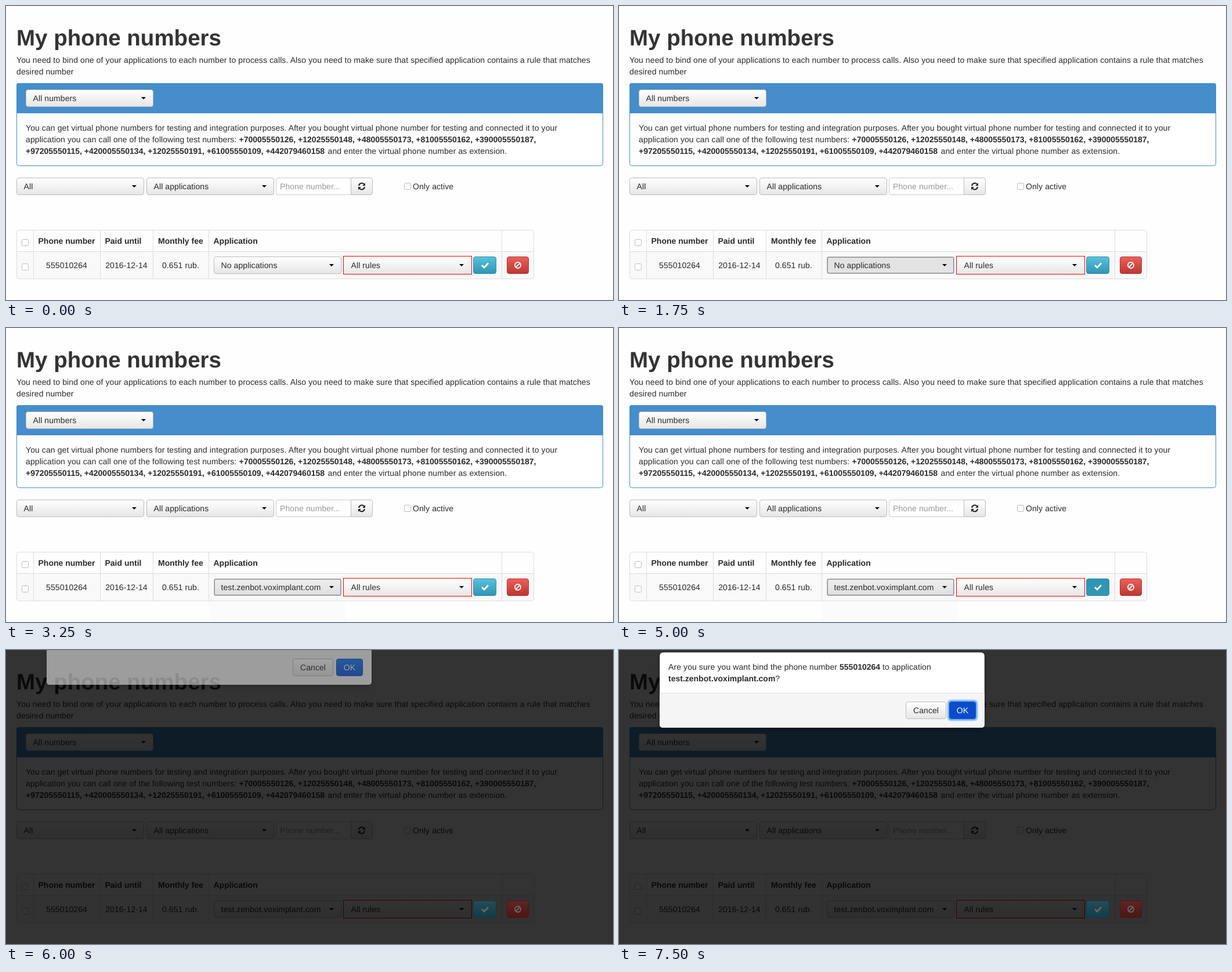
An HTML page for the animation above (8 s loop, 1046 px wide and 507 px high).

```html
<!DOCTYPE html>
<html lang="en">
<head>
<meta charset="utf-8">
<title>My phone numbers</title>
<style>
html, body { margin: 0; width: 100%; height: 100%; overflow: hidden; background: #fefefe; }
svg { display: block; }
text { font: 14px "Liberation Sans", Arial, sans-serif; fill: #2a2a2a; letter-spacing: .09px; text-rendering: geometricPrecision; white-space: pre; }
.b { font-weight: bold; letter-spacing: 0; }
.h1 { font-size: 38.5px; font-weight: bold; letter-spacing: 0; fill: #333; }
.mid { text-anchor: middle; }
.white { fill: #fff; }
.hint { fill: #999; }
.line { fill: none; stroke: #ddd; }
</style>
</head>
<body>
<svg id="stage" width="1046" height="507" viewBox="0 0 1046 507"></svg>
<script>
const LOOP = 8000;
const NUMBER = '555010264';
const APP = 'test.zenbot.voximplant.com';
const BLUE = '#458ecb';
const stage = document.getElementById('stage');

const rect = (x, y, w, h, attrs = '') => `<rect x="${x}" y="${y}" width="${w}" height="${h}" ${attrs}/>`;
const text = (x, y, s, cls = '', attrs = '') => `<text x="${x}" y="${y}" class="${cls}" ${attrs}>${s}</text>`;
const bold = s => `<tspan class="b">${s}</tspan>`;
const gradient = (id, top, bottom) =>
  `<linearGradient id="${id}" x2="0" y2="1"><stop stop-color="${top}"/><stop offset="1" stop-color="${bottom}"/></linearGradient>`;
const button = (x, y, w, fill, stroke, attrs = '') =>
  rect(x + .5, y + .5, w - 1, 29, `rx="3.5" fill="${fill}" stroke="${stroke}" ${attrs}`);
const caret = (x, y) => `<path d="M${x} ${y}h8l-4 4z" fill="#000"/>`;
const select = (x, y, label, id = '') =>
  button(x, y, 220, 'url(#light)', '#bbb', id && `id="${id}"`) +
  text(x + 12.5, y + 20, label, '', id && `id="${id}Label"`) + caret(x + 199, y + 13);
const checkbox = (x, y) => rect(x + .5, y + .5, 11, 11, 'rx="2" fill="#fff" stroke="#bbb"');
const menuItem = (id, y, label) =>
  rect(359, y, 218, 26, `id="${id}" fill="url(#hover)"`) + text(379, y + 18, label, '', `id="${id}Label"`);

const defs = `<defs>
  ${gradient('light', '#fff', '#e6e6e6')}
  ${gradient('held', '#efefef', '#dedede')}
  ${gradient('teal', '#5bc0de', '#2f96b4')}
  ${gradient('red', '#ee5f5b', '#bd362f')}
  ${gradient('blue', '#1a7cf0', '#1458e0')}
  ${gradient('hover', '#0088cc', '#0077b3')}
  <filter id="shadow" x="-10%" y="-30%" width="120%" height="170%">
    <feDropShadow dx="0" dy="4" stdDeviation="4" flood-opacity=".25"/>
  </filter>
  <filter id="glow" x="-20%" y="-30%" width="140%" height="160%"><feGaussianBlur stdDeviation="1"/></filter>
</defs>`;

const intro =
  text(18, 67.5, 'My phone numbers', 'h1') +
  text(18, 98, 'You need to bind one of your applications to each number to process calls. Also you need to make sure that specified application contains a rule that matches') +
  text(18, 118, 'desired number');

const panel =
  rect(18.5, 133.5, 1010, 142, `rx="4" fill="#fff" stroke="${BLUE}"`) +
  `<path d="M18 185V137q0-4 4-4H1025q4 0 4 4V185z" fill="${BLUE}"/>` +
  select(34, 144, 'All numbers') +
  text(34, 215, 'You can get virtual phone numbers for testing and integration purposes. After you bought virtual phone number for testing and connected it to your') +
  text(34, 235, 'application you can call one of the following test numbers:') +
  text(401.5, 235, '+70005550126, +12025550148, +48005550173, +81005550162, +390005550187,', 'b') +
  text(34, 255, '+97205550115, +420005550134, +12025550191, +61005550109, +442079460158', 'b') +
  text(554.5, 255, 'and enter the virtual phone number as extension.');

const refresh = `<g fill="none" stroke="#222" stroke-width="2">
  <path d="M608 310a5.2 5.2 0 0 1 9-2.7M618 312a5.2 5.2 0 0 1-9 2.7"/>
  <path d="M619 305v5h-5zM607 317v-5h5z" fill="#222" stroke="none"/></g>`;

const filters =
  select(18, 296, 'All') + select(242, 296, 'All applications') +
  '<path d="M594.5 296.5H469q-3.5 0-3.5 3.5v22q0 3.5 3.5 3.5H594.5z" fill="#fff" stroke="#ccc"/>' +
  text(472, 316, 'Phone number...', 'hint') +
  '<path d="M594.5 296.5H628q3.5 0 3.5 3.5v22q0 3.5-3.5 3.5H594.5z" fill="url(#light)" stroke="#bbb"/>' +
  refresh + checkbox(686, 305) + text(701, 316, 'Only active');

const actions = `<g id="actions">
  ${button(805, 432, 40, 'url(#teal)', '#2f8fab', 'id="confirm"')}
  <path d="M820 447l4 4 7-7.5" fill="none" stroke="#fff" stroke-width="2.8"/>
  ${button(863, 432, 38, 'url(#red)', '#b03a35')}
  <g fill="none" stroke="#fff" stroke-width="1.9"><circle cx="882" cy="447" r="5"/><path d="M878.5 450.5l7-7"/></g>
</g>`;

const table =
  rect(18, 424, 891, 46, 'rx="3" fill="#f9f9f9"') +
  rect(18.5, 386.5, 891, 84, 'rx="4" class="line"') +
  `<path class="line" d="M18 423.5H910${[47, 162, 253, 349, 854].map(x => `M${x}.5 387V470`).join('')}"/>` +
  checkbox(27, 402) + checkbox(27, 444) +
  text(55.5, 410, 'Phone number', 'b') + text(170.5, 410, 'Paid until', 'b') +
  text(262, 410, 'Monthly fee', 'b') + text(357.5, 410, 'Application', 'b') +
  text(104.5, 452, NUMBER, 'mid') + text(207.5, 452, '2016-12-14', 'mid') + text(301, 452, '0.651 rub.', 'mid') +
  select(358, 432, 'No applications', 'app') +
  rect(359.5, 433.5, 217, 27, 'id="focus" fill="none" stroke="#333" stroke-dasharray="1"') +
  rect(581.5, 431.5, 221, 31, 'fill="url(#light)" stroke="#f00"') +
  text(594.5, 452, 'All rules') + caret(781, 445) + actions;

const menu = `<g id="menu">
  ${rect(358.5, 464.5, 219, 70, 'rx="6" fill="#fff" stroke="#ccc" filter="url(#shadow)"')}
  ${menuItem('first', 470, 'No applications')}${menuItem('second', 496, APP)}
</g>`;

const modal = `<g id="modal">
  ${rect(70, 4, 560, 130, 'rx="6" fill="#fff" stroke="#000" stroke-opacity=".3" filter="url(#shadow)"')}
  <path d="M70 74H630V128q0 6-6 6H76q-6 0-6-6z" fill="#f5f5f5"/>
  <path d="M70 74.5H630" stroke="#ddd"/>
  ${text(85, 34, `Are you sure you want bind the phone number ${bold(NUMBER)} to application`)}
  ${text(85, 54, `${bold(APP)}?`)}
  ${button(494, 89, 70, 'url(#light)', '#bbb')}${text(529, 109, 'Cancel', 'mid')}
  ${rect(568, 88, 48, 32, 'id="ring" rx="4" fill="none" stroke="#4d9cf5" stroke-width="3" filter="url(#glow)"')}
  ${button(569, 89, 46, 'url(#blue)', '#0b4fc4', 'id="ok"')}${text(592, 109, 'OK', 'mid white')}
</g>`;

stage.innerHTML = defs + rect(0, 0, 1046, 507, 'fill="#fefefe"') + intro + panel + filters +
  rect(350, 471, 235, 36, 'id="trace" fill="#fbfbfb"') + table + menu +
  rect(0, 0, 1046, 507, 'id="shade"') + '<use id="lit" href="#actions" opacity=".25"/>' + modal;

const el = Object.fromEntries([...stage.querySelectorAll('[id]')].map(node => [node.id, node]));
const set = (id, name, value) => el[id].setAttribute(name, value);
const show = (id, on) => set(id, 'display', on ? 'inline' : 'none');

function draw(t) {
  const during = (from, to) => t >= from && t < to;
  const settled = t >= 6250;

  set('app', 'fill', during(1250, 1750) ? '#e8e8e8' : during(1750, 3250) ? '#e3e3e3' :
    during(3250, 5750) ? 'url(#held)' : 'url(#light)');
  el.appLabel.textContent = t >= 3000 ? APP : 'No applications';
  show('focus', during(1750, 5750));

  show('menu', during(2000, 3000));
  [['first', during(2250, 2500)], ['second', during(2500, 3000)]].forEach(([id, on]) => {
    show(id, on);
    el[id + 'Label'].classList.toggle('white', on);
  });
  show('trace', during(3000, 5750));
  set('confirm', 'fill', during(5000, 6000) ? '#2f96b4' : 'url(#teal)');

  set('shade', 'opacity', t < 5750 ? 0 : t < 6000 ? .27 : .8);
  show('lit', t >= 6000);
  show('modal', t >= 6000);
  set('modal', 'transform', `translate(0 ${settled ? 0 : -74})`);
  set('modal', 'opacity', settled ? 1 : .55);
  set('ok', 'fill', settled ? '#0a4ccc' : 'url(#blue)');
  show('ring', settled);
}

const start = performance.now();
function tick() {
  draw((performance.now() - start) % LOOP);
  requestAnimationFrame(tick);
}
tick();
</script>
</body>
</html>
```
